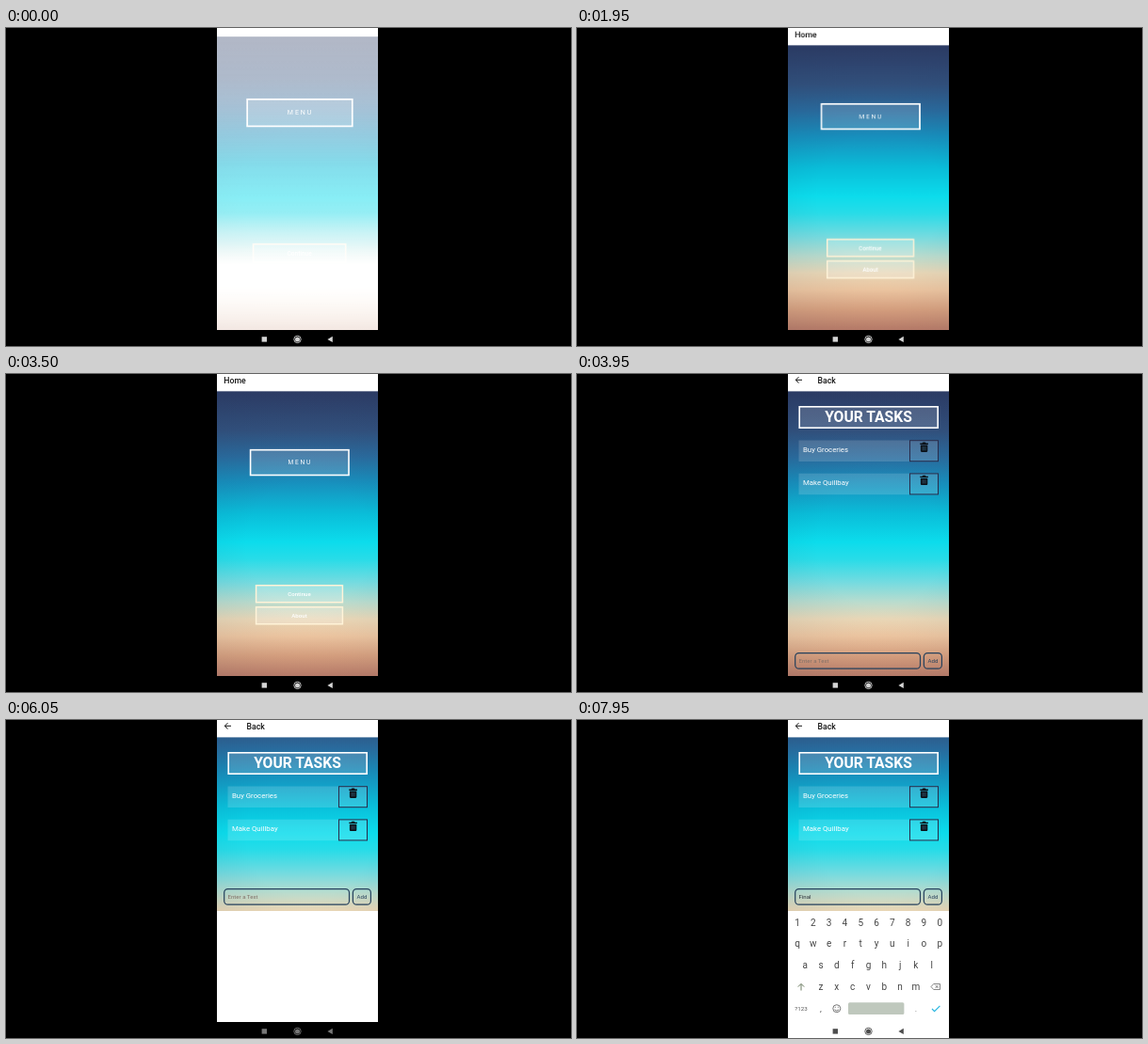
An HTML page that plays this animation: 600 px wide and 338 px high, repeating every 8 s.

```html
<!DOCTYPE html>
<html lang="en">
<head>
<meta charset="utf-8">
<title>Task app</title>
<style>
html, body { margin: 0; width: 100%; height: 100%; overflow: hidden; background: #000; }
svg { display: block; width: 100%; height: 100%; font-family: Roboto, sans-serif; }
.mid { text-anchor: middle; }
.bar { font-size: 8.7px; font-weight: 500; fill: #151515; }
.small { font-size: 6.1px; }
.frame { fill: #fff; fill-opacity: .16; stroke: #fff; stroke-width: 1.6; }
.soft { fill: #fff; fill-opacity: .22; stroke: #fff3d8; stroke-width: 1.5; }
.outline { fill: none; stroke: #24405c; stroke-width: 1.2; }
.anim, .typed tspan { animation: 8s linear infinite; }

.home { transform-origin: 309.5px 152px; animation-name: home; }
.veil { animation-name: veil; }
.tasks { transform-origin: 309.5px 152px; animation-name: tasks; }
.sky { animation-name: sky; }
.field { animation-name: field; }
.blank { animation-name: blank; }
.keyboard { animation-name: keyboard; }
.navbar { animation-name: navbar; }
.navicons { animation-name: navicons; }
.hint { animation-name: hint; }
.typed tspan:nth-child(1) { animation-name: type1; }
.typed tspan:nth-child(2) { animation-name: type2; }
.typed tspan:nth-child(3) { animation-name: type3; }
.typed tspan:nth-child(4) { animation-name: type4; }
.typed tspan:nth-child(5) { animation-name: type5; }

@keyframes home {
  0%, .6% { transform: scale(1.069); animation-timing-function: ease-out; }
  3.2%, 43.75% { transform: none; animation-timing-function: cubic-bezier(.35, .45, 0, 1); }
  48.75%, 100% { transform: scale(1.1); }
}
@keyframes veil { 0%, .6% { opacity: 1; } 3.2%, 100% { opacity: 0; } }
@keyframes tasks {
  0%, 43.75% { opacity: 0; transform: scale(.85); animation-timing-function: cubic-bezier(.35, .45, 0, 1); }
  48.75%, 100% { opacity: 1; transform: none; }
}
@keyframes sky { 0%, 74.99% { transform: none; } 75%, 100% { transform: translateY(-58.5px); } }
@keyframes field { 0%, 74.99% { transform: none; } 75%, 100% { transform: translateY(-117px); } }
@keyframes blank { 0%, 74.99% { opacity: 0; } 75%, 100% { opacity: 1; } }
@keyframes keyboard {
  0%, 76.2% { transform: translateY(136px); animation-timing-function: ease-out; }
  79.4%, 100% { transform: none; }
}
@keyframes navbar { 0%, 76.2% { opacity: 0; } 78.5%, 100% { opacity: 1; } }
@keyframes navicons {
  0%, 75% { color: #d4d4d4; }
  75.5%, 76.2% { color: #777; }
  78.5%, 100% { color: #4d4d4d; }
}
@keyframes hint { 0%, 87.49% { opacity: 1; } 87.5%, 100% { opacity: 0; } }
@keyframes type1 { 0%, 87.49% { fill-opacity: 0; } 87.5%, 100% { fill-opacity: 1; } }
@keyframes type2 { 0%, 89.99% { fill-opacity: 0; } 90%, 100% { fill-opacity: 1; } }
@keyframes type3 { 0%, 92.49% { fill-opacity: 0; } 92.5%, 100% { fill-opacity: 1; } }
@keyframes type4 { 0%, 94.99% { fill-opacity: 0; } 95%, 100% { fill-opacity: 1; } }
@keyframes type5 { 0%, 97.49% { fill-opacity: 0; } 97.5%, 100% { fill-opacity: 1; } }
</style>
</head>
<body>
<svg viewBox="0 0 600 338">
  <defs>
    <linearGradient id="dusk" gradientUnits="userSpaceOnUse" x1="0" y1="18" x2="0" y2="321">
      <stop offset="0" stop-color="#303c66"/>
      <stop offset=".14" stop-color="#34527f"/>
      <stop offset=".23" stop-color="#2b6c9f"/>
      <stop offset=".32" stop-color="#188fbd"/>
      <stop offset=".43" stop-color="#0abdd9"/>
      <stop offset=".53" stop-color="#0cdcec"/>
      <stop offset=".59" stop-color="#28dce8"/>
      <stop offset=".67" stop-color="#73dbe0"/>
      <stop offset=".74" stop-color="#b9dcce"/>
      <stop offset=".8" stop-color="#ecd9b8"/>
      <stop offset=".86" stop-color="#f3c9a2"/>
      <stop offset=".93" stop-color="#e0a480"/>
      <stop offset="1" stop-color="#c4806a"/>
    </linearGradient>
    <radialGradient id="edges" gradientUnits="userSpaceOnUse" cx="322" cy="180" r="190">
      <stop offset=".35" stop-color="#0a3050" stop-opacity="0"/>
      <stop offset="1" stop-color="#0a3050" stop-opacity=".14"/>
    </radialGradient>
    <linearGradient id="haze" gradientUnits="userSpaceOnUse" x1="0" y1="0" x2="0" y2="321">
      <stop offset=".05" stop-color="#fff" stop-opacity=".64"/>
      <stop offset=".25" stop-color="#fff" stop-opacity=".6"/>
      <stop offset=".45" stop-color="#fff" stop-opacity=".5"/>
      <stop offset=".6" stop-color="#fff" stop-opacity=".52"/>
      <stop offset=".7" stop-color="#fff" stop-opacity=".76"/>
      <stop offset=".765" stop-color="#fff"/>
      <stop offset=".83" stop-color="#fff"/>
      <stop offset="1" stop-color="#fff" stop-opacity=".75"/>
    </linearGradient>
    <clipPath id="screen"><rect x="224.3" width="170.5" height="320.7"/></clipPath>
    <clipPath id="phone"><rect x="224.3" width="170.5" height="338"/></clipPath>
    <g id="scene">
      <rect x="224" y="18" width="171" height="303" fill="url(#dusk)"/>
      <rect x="224" y="18" width="171" height="303" fill="url(#edges)"/>
    </g>
    <g id="bin">
      <path d="M364.3 73.6h2.3l.7-1h2.6l.7 1h2.3v1.3h-8.6zM364.9 75.5h7.4v6.3q0 1.1-1.1 1.1h-5.2q-1.1 0-1.1-1.1z" fill="#0b1118"/>
      <path d="M367 77v4.3M368.6 77v4.3M370.2 77v4.3" stroke="#47718c" stroke-width=".55"/>
    </g>
    <g id="row">
      <rect x="235.5" y="70.5" width="148" height="22.5" fill="#fff" fill-opacity=".15"/>
      <rect x="353.5" y="70.7" width="30" height="22" fill="none" stroke="#292b4a"/>
      <use href="#bin"/>
    </g>
  </defs>

  <rect width="600" height="338"/>

  <g clip-path="url(#screen)">
    <rect x="224" width="171" height="321" fill="#fff"/>
    <g class="anim home">
      <use href="#scene"/>
      <rect x="224" width="171" height="18.4" fill="#fff"/>
      <text class="bar" x="231.3" y="9.8">Home</text>
      <rect class="frame" x="259.6" y="80.7" width="104.4" height="26.8"/>
      <text x="299.5" y="96.2" font-size="6.6" letter-spacing="1.8" fill="#fff">MENU</text>
      <g class="mid small" font-weight="500" fill="#fff">
        <rect class="soft" x="265.6" y="224.7" width="91.8" height="18"/>
        <text x="311.5" y="236.2">Continue</text>
        <rect class="soft" x="265.6" y="247.7" width="91.8" height="18"/>
        <text x="311.5" y="259.2">About</text>
      </g>
      <rect class="anim veil" x="224" width="171" height="321" fill="url(#haze)"/>
    </g>

    <g class="anim tasks">
      <g class="anim sky"><use href="#scene"/></g>
      <rect class="anim blank" x="224" y="203" width="171" height="118" fill="#fff"/>
      <rect x="224" width="171" height="18.4" fill="#fff"/>
      <path d="M239 6.3h-6.6M235.5 3.1l-3.2 3.2 3.2 3.2" fill="none" stroke="#151515"/>
      <text class="bar" x="255.5" y="9.8">Back</text>
      <rect class="frame" x="236.2" y="34.8" width="147" height="22.4"/>
      <text class="mid" x="309.5" y="51" font-size="15.7" font-weight="700" fill="#fff">YOUR TASKS</text>
      <use href="#row"/>
      <use href="#row" y="35.2"/>
      <g font-size="7.8" fill="#fff">
        <text x="240" y="83.2">Buy Groceries</text>
        <text x="240" y="118.4">Make Quillbay</text>
      </g>
      <g class="anim field small">
        <rect class="outline" x="231.7" y="296.6" width="132.8" height="16.6" rx="4"/>
        <rect class="outline" x="368.4" y="296.6" width="19" height="16.6" rx="4"/>
        <text class="anim hint" x="235.5" y="307.2" fill="#806f67">Enter a Text</text>
        <text class="typed" x="235.5" y="307.2" fill="#28303a"><tspan>F</tspan><tspan>i</tspan><tspan>n</tspan><tspan>a</tspan><tspan>l</tspan></text>
        <text class="mid" x="378" y="307.2" fill="#24405c">Add</text>
      </g>
    </g>
  </g>

  <g clip-path="url(#phone)">
    <rect class="anim navbar" x="224" y="320.7" width="171" height="18" fill="#fff"/>
    <g class="anim keyboard">
      <rect x="224" y="203" width="171" height="118" fill="#fff"/>
      <g id="keys" class="mid" font-size="10" fill="#454545"></g>
      <path d="M238 287.5v-6.8M234.8 283.6l3.2-3.2 3.2 3.2" fill="none" stroke="#6d7d62"/>
      <path d="M376 283.5l2.7-3h6.8v6h-6.8zM380.5 281.8l3.2 3.3M383.7 281.8l-3.2 3.3" fill="none" stroke="#555" stroke-width=".7"/>
      <text class="mid" x="238" y="309" font-size="6.2" fill="#555">?123</text>
      <text class="mid" x="259" y="310" font-size="9" fill="#555">,</text>
      <g fill="none" stroke="#555" stroke-width=".8">
        <circle cx="275.8" cy="306.7" r="4"/>
        <path d="M273.5 307.8q2.3 2.6 4.6 0M274.3 304.8v1M277.3 304.8v1"/>
      </g>
      <rect x="288" y="300.3" width="59.4" height="12.7" rx="1.5" fill="#bfc8bd"/>
      <text class="mid" x="360" y="310" font-size="9" fill="#888">.</text>
      <path d="M377 307l2.6 2.6 5.8-5.8" fill="none" stroke="#29b6e0" stroke-width="1.2"/>
    </g>
  </g>

  <g class="anim navicons" fill="currentColor">
    <rect x="271.6" y="328.2" width="5.4" height="5.4"/>
    <circle cx="309.5" cy="330.9" r="3.7" fill="none" stroke="currentColor" stroke-width=".9"/>
    <circle cx="309.5" cy="330.9" r="2.5"/>
    <path d="M341.4 330.9l5.4-3.1v6.2z"/>
  </g>
</svg>
<script>
const rows = [["1234567890", 234, 219], ["qwertyuiop", 234, 240.5], ["asdfghjkl", 242.3, 263.5], ["zxcvbnm", 259, 286.5]];
const keys = document.getElementById("keys");
for (const [letters, left, y] of rows) {
  [...letters].forEach((letter, i) => {
    const key = document.createElementNS(keys.namespaceURI, "text");
    key.setAttribute("x", left + i * 16.8);
    key.setAttribute("y", y);
    key.textContent = letter;
    keys.append(key);
  });
}
</script>
</body>
</html>
```
